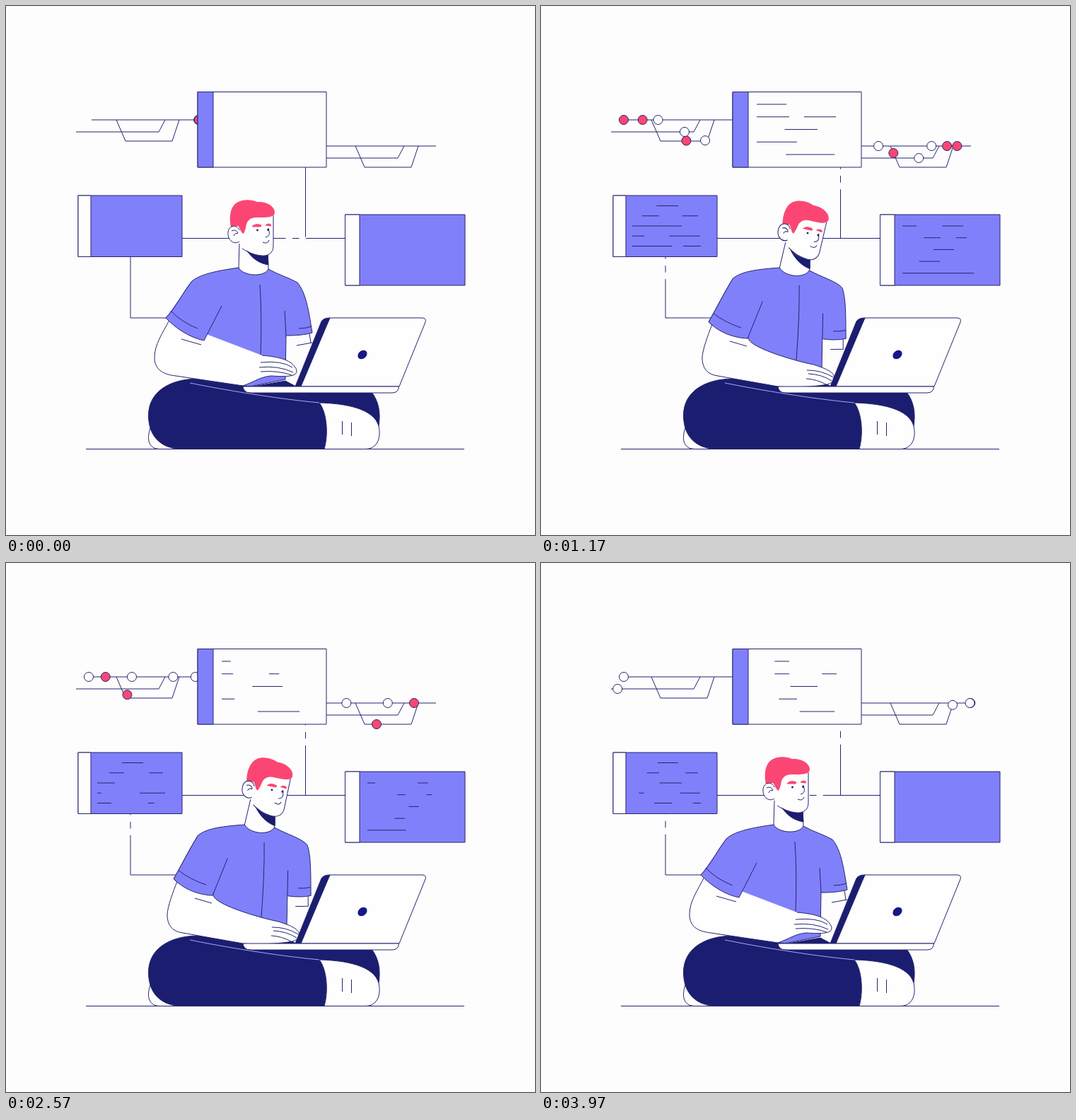
Recreate the animation shown at these times as an HTML page with a canvas. Size 748x748 px, loop 4010 ms.

```html
<!DOCTYPE html>
<html lang="en">
<head>
<meta charset="utf-8">
<title>Coder at work</title>
<style>
html, body { margin: 0; width: 100%; height: 100%; overflow: hidden; background: #fdfdfd; }
canvas { display: block; width: 748px; height: 748px; }
</style>
</head>
<body>
<canvas id="stage" width="748" height="748"></canvas>
<script>
const LOOP = 4010;
const PAPER = '#fdfdfd', WHITE = '#fefefe', INK = '#24246f', NAVY = '#1b1d70', VIOLET = '#8180fb', RED = '#fb4674';
const ctx = document.getElementById('stage').getContext('2d');

function shape(d, fill, stroke = INK, width = 1) {
  const p = new Path2D(d);
  if (fill) { ctx.fillStyle = fill; ctx.fill(p); }
  if (stroke) { ctx.strokeStyle = stroke; ctx.lineWidth = width; ctx.stroke(p); }
}
const line = (d, color, width) => shape(d, null, color, width);
const box = (x, y, X, Y, fill) => shape(`M${x},${y}H${X}V${Y}H${x}Z`, fill);
function dot(x, y, r, fill, stroke) {
  shape(`M${x - r},${y}a${r},${r} 0 1 0 ${2 * r},0a${r},${r} 0 1 0 ${-2 * r},0Z`, fill, stroke);
}
const lerp = (a, b, k) => a + (b - a) * k;
const clamp = u => Math.min(1, Math.max(0, u));
const random = seed => Math.abs(Math.sin(seed * 12.9898) * 43758.5453) % 1;

// Blends two path strings of the same structure.
function blend(a, b, k) {
  const nums = b.match(/-?[\d.]+/g);
  let i = 0;
  return a.replace(/-?[\d.]+/g, n => lerp(+n, +nums[i++], k).toFixed(2));
}

function keyed(keys, t) {
  let i = 1;
  while (i < keys.length - 1 && t > keys[i][0]) i++;
  const [t0, a] = keys[i - 1], [t1, b] = keys[i];
  const u = clamp((t - t0) / (t1 - t0));
  return lerp(a, b, u * u * (3 - 2 * u));
}

// Connectors with pulses: two gaps around a short dash.
function gaps(x, y, dx, dy, at, length) {
  for (const side of [-9.5, 9.5]) {
    const a = Math.max(0, at + side - 4.7), b = Math.min(length, at + side + 4.7);
    if (b > a) line(`M${x + dx * a},${y + dy * a}L${x + dx * b},${y + dy * b}`, PAPER, 4);
  }
}
function connectors(t) {
  line('M249,328.5H479M423.5,228V328M176,355V441H245');
  for (let k = -1; k < 3; k++) {
    const age = t - 1170 - 1390 * k, climb = 17 - 0.12 * age;
    gaps(249, 328.5, 1, 0, 133 + 0.126 * age, 230);
    if (k < 0) continue;
    gaps(423.5, 228, 0, 1, climb, 98);
    gaps(176, 355, 0, 1, climb, 85);
    gaps(176, 441, 1, 0, climb - 86, 70);
  }
}

// Both sides follow one timetable of commits, each track with its own lag.
const timetable = {
  main: { red: [0, 290, 1670, 2680], white: [440, 1455, 1925, 2325, 2540] },
  loop: { red: [0, 675, 1265, 1865, 2698], white: [825, 2845] },
  side: { red: [], white: [720, 1362, 2988] }
};
const left = {
  rest: 60,
  main: { pts: [[273, 161], [117, 161]], v: .146, lag: -5 },
  loop: { pts: [[273, 161], [250, 161], [240, 190], [173, 191], [163, 161], [117, 161]], v: .178, lag: 0 },
  side: { pts: [[273, 161], [225, 161], [216, 178], [99, 178]], v: .178, lag: 0 }
};
const right = {
  rest: 0,
  main: { pts: [[451, 198], [608, 198]], v: .146, lag: 38 },
  loop: { pts: [[451, 198], [494, 198], [507, 228], [573, 228], [583, 198], [608, 198]], v: .185, lag: 205 },
  side: { pts: [[451, 215], [554, 215], [563, 198], [608, 198]], v: .155, lag: -86 }
};
function along(pts, way, slack) {
  if (way < 0) return null;
  for (let i = 1; i < pts.length; i++) {
    const [x, y] = pts[i - 1], [X, Y] = pts[i], len = Math.hypot(X - x, Y - y);
    if (way <= len) return [lerp(x, X, way / len), lerp(y, Y, way / len)];
    way -= len;
  }
  return way < slack ? pts[pts.length - 1] : null;
}
function branches(t) {
  line('M121,161H271M99,178H216L225,161M156,161L169,191H235L245,161');
  line('M453,198H608M453,215H554L563,198M494,198L507,228H573L583,198');
  for (const tree of [left, right]) for (const name in timetable) for (const color of ['white', 'red']) {
    const { pts, v, lag } = tree[name];
    for (const start of timetable[name][color]) {
      const p = along(pts, (t - start - lag) * v, tree.rest * v);
      if (p) dot(...p, 6.5, color === 'red' ? RED : WHITE);
    }
  }
}

// Code: each row lists its dashes as [from, to]; done is the share of the last cycle played.
const blocks = [
  { x: 305, y: 139, step: 17.75, done: .82, rows: [[[0, 46]], [[0, 46], [67, 113]], [[0, 86]], [[0, 57]], [[0, 110]]] },
  { x: 129, y: 282.5, step: 14.25, done: .82, rows: [[[0, 65]], [[0, 38], [54, 93]], [[0, 70]], [[0, 17], [33, 96]], [[0, 56], [72, 97]]] },
  { x: 511, y: 311, step: 16.7, done: 1, rows: [[[0, 20], [38, 86]], [[0, 54], [62, 91]], [[0, 73]], [[0, 53]], [[0, 101]]] }
];
function code(t) {
  let seed = 0;
  for (const { x, y, step, done, rows } of blocks) rows.forEach((row, i) => {
    for (const [from, to] of row) {
      seed++;
      const delay = 250 * random(seed), cycles = 1 + Math.round(random(seed + 50)) + done;
      const u = Math.max(0, (t - delay) / (3970 - delay) * cycles) % 1;
      const a = lerp(from, to, clamp((u - .6) / .4)), b = lerp(from, to, clamp(u / .5));
      if (b - a > .3) line(`M${x + a},${y + i * step}H${x + b}`);
    }
  });
}

function panels(t) {
  box(271, 121.5, 453, 228, PAPER);
  box(271, 121.5, 293, 228, VIOLET);
  box(102, 268, 249, 354.5, VIOLET);
  box(102, 268, 120, 354.5, WHITE);
  box(479.5, 295, 649, 395, VIOLET);
  box(479.5, 295, 500, 395, WHITE);
  code(t);
}

function legs() {
  line('M113,626.5H648');
  shape('M205,594C198,612 201,626.5 218,626.5H250L240,590Z', WHITE);
  shape('M270,527C230,528 201.5,546 201.5,579C201.5,611 222,626.5 249,626.5H450C456,606 454,575 443,561C480,562 520,569 527,594C530,575 527,559 517,546L410,538L395,530L350,538Z', NAVY);
  shape('M443,561C480,562 520,569 527,594C531,612 524,626.5 508,626.5H450C456,606 454,575 443,561Z', WHITE);
  line('M260,533C310,543 380,555 443,561', '#a9a8fa');
  line('M475.5,587V606M488.5,589V608');
}

function torso(k) {
  const mix = (a, b) => blend(a, b, k);
  line(mix('M429,463L431,476M411,480L433,476', 'M427,472L427,486M409,486L427,486'));
  shape(mix(
    'M329,370C300,374 275,379 263,389C250,405 240,427 226,441C240,456 260,469 280,473L283,530L345,538L395,528L396,466C410,466 423,465 433,462C428,430 424,405 412,391C400,384 385,380 371,372Z',
    'M338,370C310,372 285,374 272,385C260,405 250,425 238,447C250,460 270,469 293,470L290,530L350,538L397,520L398,471C410,473 421,473 431,471C431,440 432,415 427,399C418,389 398,384 380,374Z'), VIOLET);
  line(mix('M359,394Q362,440 360,495M394,431L396,466M414,456Q424,456 432,453',
    'M365.5,395Q366,440 361,502M399,435L398,471M413,460Q422,461 430,459'));
}

// The hands reach the keys before the body settles.
function arm(k) {
  const reach = 1 - (1 - k) ** 2, mix = (a, b) => blend(a, b, reach);
  shape(mix(
    'M231,444C222,462 210,478 210,497C210,514 222,521 240,523L335,537C350,532 360,524 375,523C390,524 400,524 406,522C412,520 412,515 409,511C402,500 385,496 362,494L333,495L274,478L279,470Z',
    'M243,448C235,468 229,485 228,497C228,512 235,521 250,523L335,538C360,540 390,538 405,535C412,533 415,530 414,526C416,520 408,514 385,507L355,501L289,481L293,468Z'), WHITE);
  line(mix('M248,471L276,479M360,504Q390,501 405,511M358,511Q385,508 406,518M360,517Q385,515 404,522',
    'M267,474L291,481M376,515Q397,515 413,525M378,520Q397,521 411,530M375,527Q390,528 403,535'));
}

function sleeve(k) {
  const mix = (a, b) => blend(a, b, k);
  shape(mix('M305,424L280,473C260,469 240,456 226,441L263,389Z', 'M314,417L293,470C270,469 250,460 238,447L272,385Z'), VIOLET, null);
  line(mix('M305,424L280,473C260,469 240,456 226,441C240,427 250,405 263,389M233,431Q248,447 271,456',
    'M314,417L293,470C270,469 250,460 238,447C250,425 260,405 272,385M245,435Q260,447 284,455'));
}

function head(k, angle) {
  const mix = (a, b) => blend(a, b, k);
  shape(mix('M330,336L329,370C335,382 365,384 371,372L370,348', 'M347,334L338,370C345,383 373,386 380,374L381,354'), WHITE);
  shape(mix('M340,345C350,352 362,353 370,351L371,366C358,364 348,357 340,345Z',
    'M354,345C363,355 372,359 381,357L381,372C370,368 360,358 354,345Z'), NAVY);
  ctx.save();
  ctx.translate(352 + 9 * k, 376 + 2 * k);
  ctx.rotate(angle * Math.PI / 180);
  ctx.translate(-352, -376);
  shape('M322,300L378,296V339C378,349 371,354 361,353C351,352 341,348 334,340L327,325Z', WHITE, null);
  line('M378,296V339C378,349 371,354 361,353C351,352 341,348 334,343');
  shape('M318,313C315,299 317,285 325,279C335,272 348,274 355,277C369,276 381,284 380,293C378,300 365,299 354,299C346,299 342,303 340,308C339,315 337,320 336,322C332,321 331,314 328,311Z', RED, null);
  shape('M330,317C327,309 315,309 314,320C313,332 323,338 330,333', WHITE);
  line('M319,318Q325,315 328,321M322,325Q324,320 328,322');
  shape('M348,312C351,308 357,308 361,310L360,312Z', RED, RED);
  shape('M367,310C370,307 374,308 375,310L374,311Z', RED, RED);
  line('M371,314C372,319 375,325 367,327M363,334Q370,337 372,331');
  dot(355.5, 317, 1.4, NAVY, null);
  dot(370.5, 316.5, 1.4, NAVY, null);
  ctx.restore();
}

function laptop() {
  shape('M458,441H588Q595,441 593,447L556,538H410Z', WHITE);
  shape('M446,446Q449,441 458,441L417,538H409Z', NAVY);
  shape('M335,538H555.5Q555,547 546,547H346Q336,547 335,538Z', WHITE);
  ctx.beginPath();
  ctx.ellipse(504, 493, 7.2, 5.6, -.7, 0, 7);
  ctx.fillStyle = '#17178a';
  ctx.fill();
}

const lean = [[0, 0], [450, 1], [1100, .93], [2700, .93], [3500, 0]];
const nod = [[0, 0], [450, 13.3], [1170, 13], [1570, 15.2], [2570, 11.9], [3600, 0]];

function draw(t) {
  ctx.fillStyle = PAPER;
  ctx.fillRect(0, 0, 748, 748);
  const k = keyed(lean, t);
  branches(t);
  connectors(t);
  panels(t);
  legs();
  torso(k);
  arm(k);
  sleeve(k);
  head(k, keyed(nod, t));
  laptop();
}

const begin = performance.now();
function tick() {
  draw((performance.now() - begin) % LOOP);
  requestAnimationFrame(tick);
}
tick();
</script>
</body>
</html>
```
